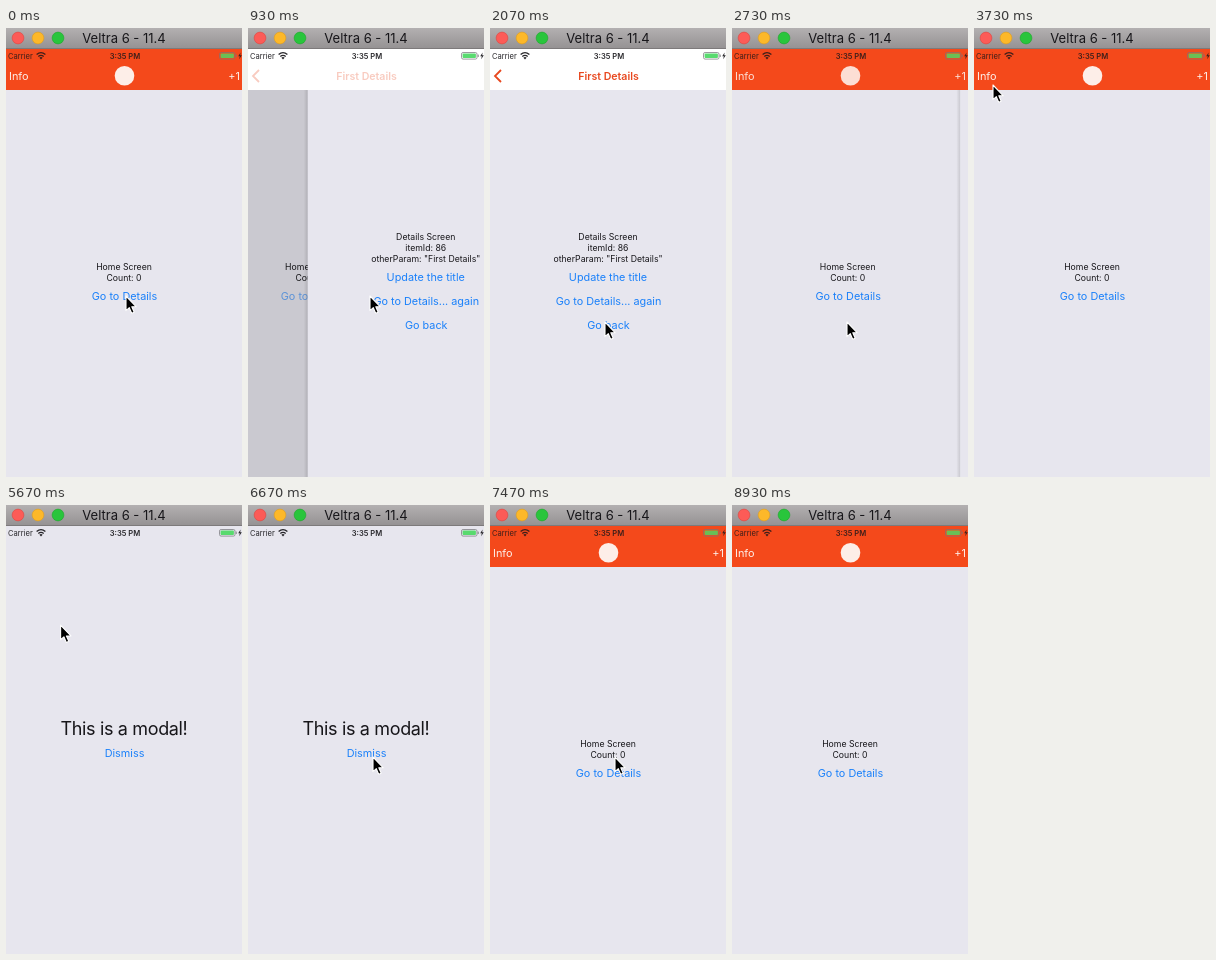
Animation, 236 px wide and 449 px high, one loop 9070 ms. Source, as an HTML page:

```html
<!DOCTYPE html>
<html lang="en">
<head>
<meta charset="utf-8">
<title>Stack navigation demo</title>
<style>
  html, body { margin: 0; width: 100%; height: 100%; overflow: hidden; background: #e7e6ee; }
  svg { display: block; width: 236px; height: 449px; }
  text { font-family: Inter, Roboto, "Liberation Sans", sans-serif; fill: #17161a; }
  .mid { text-anchor: middle; }
  .end { text-anchor: end; }
  .body { font-size: 8.7px; }
  .link { font-size: 10.85px; fill: #1a80fa; }
  .bar { font-size: 10.9px; fill: #fdeee8; }
  .title { font-size: 10.6px; font-weight: 600; fill: #e8481f; }
  .big { font-size: 18px; letter-spacing: -.35px; }
  .status { font-size: 7.6px; }
  .page { fill: #e7e6ee; }
</style>
</head>
<body>
<svg viewBox="0 0 236 449">
  <defs>
    <linearGradient id="chrome" x2="0" y2="1">
      <stop offset="0" stop-color="#b3b0b1"/>
      <stop offset="1" stop-color="#959293"/>
    </linearGradient>
    <linearGradient id="edge">
      <stop offset="0" stop-opacity="0"/>
      <stop offset="1" stop-opacity=".13"/>
    </linearGradient>
  </defs>

  <rect class="page" width="236" height="449"/>

  <g id="home">
    <rect class="page" y="62" width="236" height="387"/>
    <text class="body mid" x="118" y="242">Home Screen</text>
    <text class="body mid" x="118" y="252.6">Count: 0</text>
    <text class="link mid" id="go" x="118.5" y="271.5">Go to Details</text>
  </g>
  <rect id="dim" y="62" width="236" height="387"/>

  <g id="details">
    <rect x="-4" y="62" width="4" height="387" fill="url(#edge)"/>
    <rect class="page" y="62" width="236" height="387"/>
    <text class="body mid" x="118" y="212">Details Screen</text>
    <text class="body mid" x="118" y="222.8">itemId: 86</text>
    <text class="body mid" x="118" y="233.6">otherParam: "First Details"</text>
    <text class="link mid" x="118" y="253">Update the title</text>
    <text class="link mid" x="118.5" y="277">Go to Details... again</text>
    <text class="link mid" id="back" x="118.5" y="301">Go back</text>
  </g>

  <rect id="header" y="20" width="236" height="42"/>
  <g id="homeBar">
    <text class="bar" id="info" x="3" y="52">Info</text>
    <circle cx="118.5" cy="47.7" r="9.8" fill="#fdeee8"/>
    <text class="bar end" x="234" y="52">+1</text>
  </g>
  <g id="detailsBar">
    <path d="M11 42L5 48L11 54" fill="none" stroke="#e8481f" stroke-width="1.8"/>
    <text class="title mid" x="118.5" y="51.6">First Details</text>
  </g>

  <rect id="shade" y="20" width="236" height="429"/>
  <g id="modal">
    <rect class="page" y="21" width="236" height="428"/>
    <text class="big mid" x="118" y="230.3">This is a modal!</text>
    <text class="link mid" id="dismiss" x="118.5" y="251.5">Dismiss</text>
  </g>

  <g id="status" opacity=".92">
    <text class="status" x="2" y="30.6">Carrier</text>
    <g fill="none" stroke="#17161a" stroke-width="1.3">
      <path d="M30.6 26.6Q35 22.6 39.4 26.6"/>
      <path d="M32.3 28.5Q35 26.2 37.7 28.5"/>
    </g>
    <path d="M33.4 29.7Q35 28.5 36.6 29.7L35 31.4Z" fill="#17161a"/>
    <text class="status mid" x="119" y="30.6" font-weight="600">3:35 PM</text>
    <rect x="213.5" y="24.5" width="15.5" height="6.6" rx="1.6" fill="none" stroke="#77777c" stroke-width=".8"/>
    <rect x="214.6" y="25.6" width="13.3" height="4.4" rx=".8" fill="#4cd964"/>
    <path d="M230.2 26.6V29" stroke="#77777c"/>
    <path d="M234.6 24.5L232.2 28.2H233.8L233.2 31.2L235.8 27.2H234.2Z" fill="#17161a"/>
  </g>

  <rect width="236" height="20.5" fill="url(#chrome)"/>
  <rect y="20" width="236" height="1" fill="#7d7a7b"/>
  <g stroke-width=".6">
    <circle cx="12" cy="10" r="5.9" fill="#fc5b57" stroke="#dd4641"/>
    <circle cx="32" cy="10" r="5.9" fill="#fdb829" stroke="#dd9c1f"/>
    <circle cx="52" cy="10" r="5.9" fill="#29c53c" stroke="#1da62c"/>
  </g>
  <text class="mid" x="118" y="14.8" font-size="13">Veltra 6 - 11.4</text>

  <path id="cursor" d="M0 0V14.6L3.3 11.7L5.7 17.3L8.2 16.2L5.8 10.8H10.3Z"
        stroke="#fff" stroke-width="1.1" stroke-linejoin="round"/>
</svg>
<script>
const LOOP = 9070, FRAME = 1000 / 15, SLIDE = 500, PRESS = 130;
const PUSH = 670, POP = 2330, OPEN = 4270, CLOSE = 6670; // finger-down times
const CURSOR_GONE = 7930;

// time, x, y of the pointer tip
const path = [
  [0, 120, 268], [70, 119, 267], [270, 119, 267], [330, 125, 269], [400, 122, 268],
  [1530, 122, 268], [2070, 115, 294], [2870, 115, 294], [3730, 19, 57],
  [3800, 19, 57], [4070, 17, 50], [5330, 17, 50], [6200, 128, 257],
  [6270, 128, 257], [6530, 125, 252], [7530, 125, 252], [CURSOR_GONE, 250, 330]
];

const $ = id => document.getElementById(id);
const clamp = v => Math.min(1, Math.max(0, v));
const move = (id, x, y) => $(id).setAttribute("transform", `translate(${x} ${y})`);
const alpha = (id, v) => $(id).setAttribute("opacity", v);

const bez = (u, a, b) => 3 * u * (1 - u) * ((1 - u) * a + u * b) + u ** 3;

// cubic-bezier(.2833, .99, .31833, .99)
function ease(x) {
  if (x <= 0 || x >= 1) return clamp(x);
  let lo = 0, hi = 1;
  for (let i = 0; i < 24; i++) {
    const m = (lo + hi) / 2;
    if (bez(m, .2833, .31833) < x) lo = m; else hi = m;
  }
  return bez(lo, .99, .99);
}

const slide = (t, down) => ease((t - down - PRESS) / SLIDE);
const appear = p => clamp((p - .65) / .35);

// touch feedback: dip to 20% opacity, then recover
function touch(t, down) {
  const d = t - down;
  return 1 - .8 * (d < PRESS ? clamp(d / PRESS) : 1 - clamp((d - PRESS) / 250));
}

function pointer(t) {
  let i = 0;
  while (i < path.length - 2 && t >= path[i + 1][0]) i++;
  const [t0, x0, y0] = path[i], [t1, x1, y1] = path[i + 1];
  const k = clamp((t - t0) / (t1 - t0)), s = k * k * (3 - 2 * k);
  return [x0 + (x1 - x0) * s, y0 + (y1 - y0) * s];
}

function draw(t) {
  const p = slide(t, PUSH) - slide(t, POP);
  const m = slide(t, OPEN) - slide(t, CLOSE);
  const white = t >= PUSH + PRESS && t < POP + PRESS;

  move("home", -71 * p, 0);
  alpha("dim", .17 * p);
  move("details", 240 * (1 - p) - (p > 0 ? 4 * (1 - p) : 0), 0);
  $("header").setAttribute("fill", white ? "#fff" : "#f4491b");
  alpha("homeBar", appear(1 - p));
  alpha("detailsBar", appear(p));

  alpha("shade", .17 * m);
  move("modal", 0, 429 * (1 - m));
  alpha("status", m > .5 || white ? .92 : .82);

  alpha("go", touch(t, PUSH));
  alpha("back", touch(t, POP));
  alpha("info", touch(t, OPEN));
  alpha("dismiss", touch(t, CLOSE));

  move("cursor", ...pointer(t));
  alpha("cursor", t < CURSOR_GONE ? 1 : 0);
}

const start = performance.now();
function tick() {
  const now = (performance.now() - start) % LOOP;
  const n = Math.floor((now + 5) / FRAME);
  draw(Math.round(n * FRAME / 10) * 10 % LOOP);
  requestAnimationFrame(tick);
}
tick();
</script>
</body>
</html>
```
